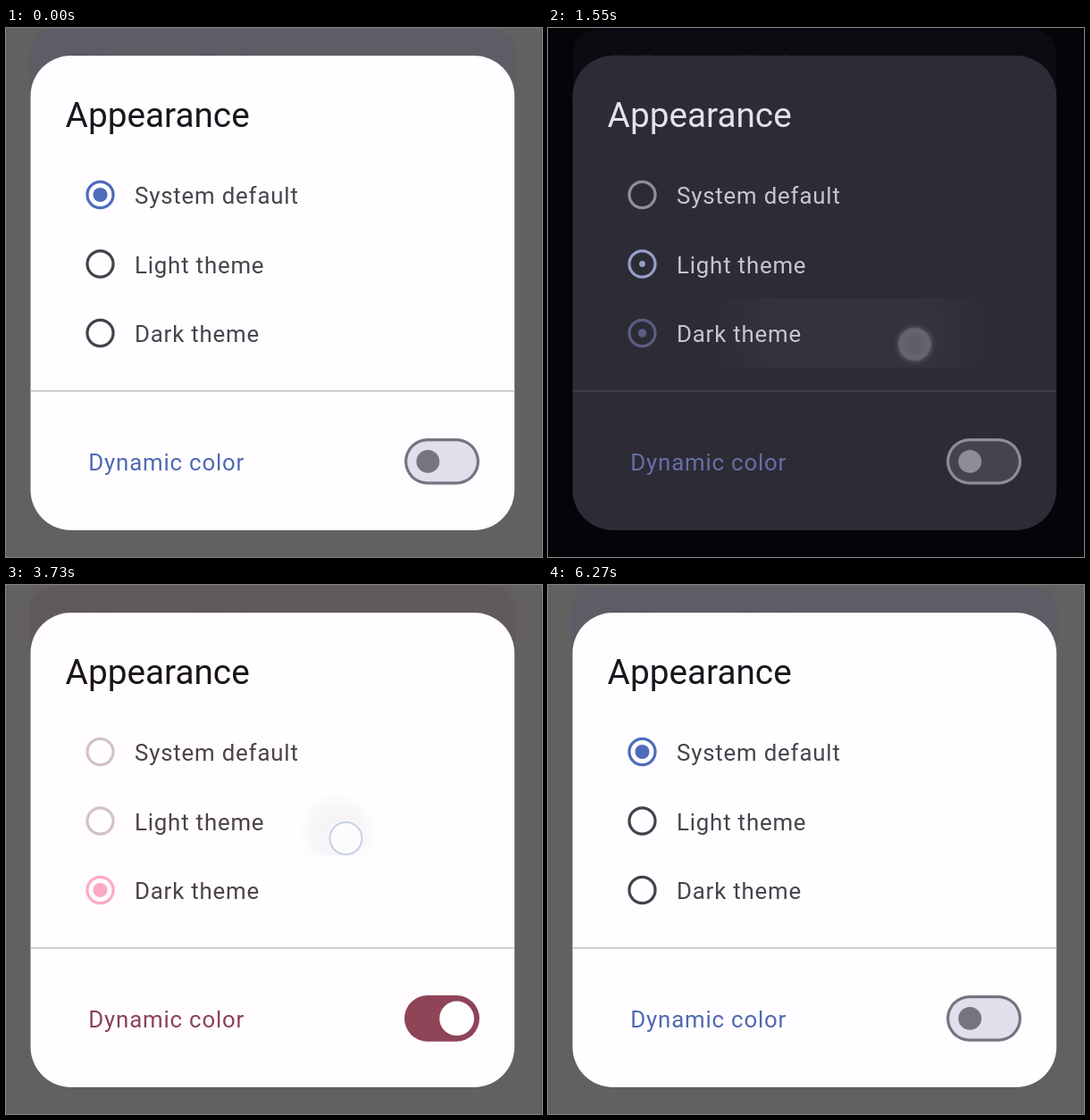
Animation of 600x593 px, one loop 6300 ms. Source, as an HTML page with a canvas:

```html
<!DOCTYPE html>
<html lang="en">
<head>
<meta charset="utf-8">
<title>Appearance</title>
<style>
  html, body { margin: 0; width: 100%; height: 100%; overflow: hidden; background: #636062; }
  canvas { display: block; width: 600px; height: 593px; }
</style>
</head>
<body>
<canvas id="stage" width="600" height="593"></canvas>
<script>
const canvas = document.getElementById('stage');
const ratio = window.devicePixelRatio || 1;
canvas.width = Math.round(600 * ratio);
canvas.height = Math.round(593 * ratio);
const ctx = canvas.getContext('2d');
ctx.scale(ratio, ratio);

const LOOP = 6300;
const DP = 1.6154;

const themes = {
  light: {
    back: '#636062', card: '#605c65', cardX: 26, hint: '#5a5660', dialog: '#fffdff',
    title: '#17171c', body: '#45454b', label: '#4f69b2', divider: '#c4c3c7',
    radio: '#45434a', picked: '#4f6bbb',
    track: '#dfe0ec', outline: '#767480', thumb: '#767480', ripple: '0,0,0', on: false
  },
  dark: {
    back: '#060409', card: '#0b0c11', cardX: 28, hint: '#15161c', dialog: '#2d2b36',
    title: '#e5e1ea', body: '#c8c5d2', label: '#6570a6', divider: '#42424d',
    radio: '#c8c5d2', picked: '#6872a9',
    track: '#45434f', outline: '#8f8c99', thumb: '#8f8c99', ripple: '255,255,255', on: false
  },
  darkRose: {
    back: '#070406', card: '#110c0e', cardX: 28, hint: '#1b1518', dialog: '#37282b',
    title: '#eedfe1', body: '#d5c2c5', label: '#fdb1c7', divider: '#484257',
    radio: '#d4c2c5', picked: '#fcaac4', row: '#392c36',
    track: '#f3a9bf', outline: '#f3a9bf', thumb: '#571a30', ripple: '255,255,255', on: true
  },
  lightRose: {
    back: '#636061', card: '#615a5c', cardX: 26, hint: '#5b5456', dialog: '#fffdff',
    title: '#1a1519', body: '#4a4347', label: '#8b4357', divider: '#c5c3c5',
    radio: '#4f4246', picked: '#8f4458',
    track: '#8f4458', outline: '#8f4458', thumb: '#ffffff', ripple: '0,0,0', on: true
  }
};

// Each state holds until the next one begins.
const states = [
  { t: -900, theme: themes.light, pick: 0 },
  { t: 660, theme: themes.light, pick: 1 },
  { t: 1475, theme: themes.dark, pick: 2 },
  { t: 2450, theme: themes.darkRose, pick: 2 },
  { t: 3720, theme: themes.lightRose, pick: 1 },
  { t: 4540, theme: themes.lightRose, pick: 0 },
  { t: 5350, theme: themes.light, pick: 0 }
];

const taps = [
  { t: 600, x: 418, y: 275, row: 1 },
  { t: 1400, x: 410.5, y: 354.5, row: 2 },
  { t: 2385, x: 352, y: 492, row: 3 },
  { t: 3680, x: 380.5, y: 284, row: 1 },
  { t: 4475, x: 388, y: 196, row: 0 },
  { t: 5310, x: 364, y: 482, row: 3 }
];

const options = ['System default', 'Light theme', 'Dark theme'];
const rowMid = [187, 264.5, 342, 485];
const ROW = { x: 67, w: 463, h: 77 };

const clamp = v => Math.max(0, Math.min(1, v));
const lerp = (a, b, p) => a + (b - a) * p;
const ease = p => p * p * (3 - 2 * p);

function mix(a, b, p) {
  const part = (s, i) => parseInt(s.slice(i, i + 2), 16);
  return 'rgb(' + [1, 3, 5].map(i => Math.round(lerp(part(a, i), part(b, i), p))).join(',') + ')';
}

function box(x, y, w, h, r, color) {
  ctx.fillStyle = color;
  ctx.beginPath();
  ctx.roundRect(x, y, w, h, r);
  ctx.fill();
}

function disc(x, y, r, color) {
  ctx.fillStyle = color;
  ctx.beginPath();
  ctx.arc(x, y, r, 0, Math.PI * 2);
  ctx.fill();
}

function ring(x, y, r, width, color) {
  ctx.strokeStyle = color;
  ctx.lineWidth = width;
  ctx.beginPath();
  ctx.arc(x, y, r, 0, Math.PI * 2);
  ctx.stroke();
}

function text(str, x, y, size, spacing, color) {
  ctx.font = `400 ${size}px Roboto, sans-serif`;
  ctx.letterSpacing = spacing + 'px';
  ctx.fillStyle = color;
  ctx.fillText(str, x, y);
}

function radial(x, y, r, stops) {
  const g = ctx.createRadialGradient(x, y, 0, x, y, r);
  for (const [at, color] of stops) g.addColorStop(at, color);
  return g;
}

function drawBackdrop(th) {
  ctx.fillStyle = th.back;
  ctx.fillRect(0, 0, 600, 593);
  box(th.cardX, 1, 597 - 2 * th.cardX, 62, [28, 28, 0, 0], th.card);
  ctx.fillStyle = th.hint;
  for (const [x, w] of [[72, 20], [102, 14], [212, 24], [262, 8]]) ctx.fillRect(x, 29.5, w, 1.5);
  box(27.5, 31, 541.7, 532, 28 * DP, th.dialog);
}

function drawRipple(tap, time, th) {
  const age = time - tap.t;
  if (age < 0 || age > 480) return;
  const p = clamp(age / 225);
  const grow = Math.pow(p, 1.6);
  const mid = rowMid[tap.row];
  const x = lerp(tap.x, ROW.x + ROW.w / 2, clamp(grow * 1.2));
  const y = lerp(tap.y, mid, clamp(grow * 4));
  const r = 20 + 270 * grow;
  const fade = 1 - ease(clamp((age - 180) / 300));
  const a = 0.04 * clamp(age / 40) * fade;
  ctx.save();
  ctx.beginPath();
  ctx.rect(ROW.x, mid - ROW.h / 2, ROW.w, ROW.h);
  ctx.clip();
  disc(x, y, r, radial(x, y, r, [
    [0, `rgba(${th.ripple},${a})`],
    [0.6, `rgba(${th.ripple},${a * 0.8})`],
    [1, `rgba(${th.ripple},0)`]
  ]));
  ctx.restore();
}

function drawPointer(tap, time) {
  const age = time - tap.t;
  if (age < -75 || age > 190) return;
  const { x, y } = tap;
  ctx.save();
  ctx.globalAlpha = clamp((age + 75) / 30) * (1 - clamp((age - 70) / 120));
  disc(x, y, 24, radial(x, y, 24, [
    [0, 'rgba(255,255,255,0.64)'],
    [0.4, 'rgba(255,255,255,0.68)'],
    [0.68, 'rgba(255,255,255,0.78)'],
    [0.76, 'rgba(255,255,255,0.3)'],
    [1, 'rgba(255,255,255,0)']
  ]));
  ring(x, y, 18, 2, 'rgba(150,165,215,0.5)');
  ctx.restore();
}

function drawRadios(prev, now, p) {
  options.forEach((name, i) => {
    const y = rowMid[i];
    const tone = s => (s.pick === i ? s.theme.picked : s.theme.radio);
    const color = mix(tone(prev), tone(now), p);
    const dot = 5 * DP * lerp(prev.pick === i ? 1 : 0, now.pick === i ? 1 : 0, p);
    ring(105.5, y, 9 * DP, 2 * DP, color);
    if (dot > 0.1) disc(105.5, y, dot, color);
    text(name, 144, y + 10, 16 * DP, 0.5 * DP, now.theme.body);
  });
}

function drawSwitch(prev, th, p) {
  const on = lerp(prev.theme.on ? 1 : 0, th.on ? 1 : 0, p);
  box(446, 460, 84, 51.7, 25.85, th.outline);
  box(449.2, 463.2, 77.6, 45.3, 22.6, th.track);
  disc(lerp(472.3, 504.6, on), 485.9, lerp(8, 12, on) * DP, th.thumb);
}

function draw(time) {
  let k = states.length - 1;
  while (k > 0 && states[k].t > time) k--;
  const now = states[k];
  const prev = states[Math.max(0, k - 1)];
  const th = now.theme;
  const age = time - now.t;
  const p = ease(clamp((age - 15) / 110));

  drawBackdrop(th);
  if (th.row) {
    ctx.globalAlpha = ease(clamp(age / 250));
    ctx.fillStyle = th.row;
    ctx.fillRect(ROW.x, 447, ROW.w, 76);
    ctx.globalAlpha = 1;
  }
  for (const tap of taps) drawRipple(tap, time, th);
  text('Appearance', 66.6, 111, 24 * DP, 0, th.title);
  drawRadios(prev, now, p);
  ctx.fillStyle = th.divider;
  ctx.fillRect(27.5, 406.1, 541.7, 1.6);
  text('Dynamic color', 92.3, 495.5, 16 * DP, 0.5 * DP, th.label);
  drawSwitch(prev, th, p);
  for (const tap of taps) drawPointer(tap, time);
}

const start = performance.now();
function tick() {
  draw((performance.now() - start) % LOOP);
  requestAnimationFrame(tick);
}
tick();
</script>
</body>
</html>
```
